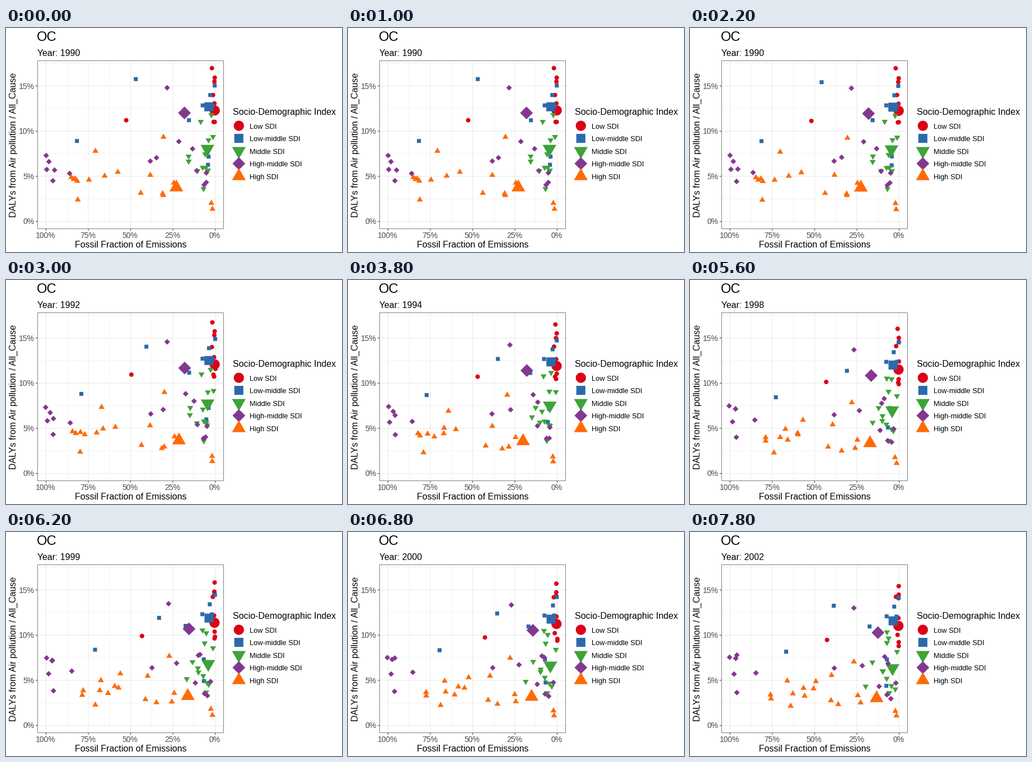
Write a matplotlib script that moves like this. It is 600x400 px and loops after 8000 ms.

```python
import numpy as np
import matplotlib.pyplot as plt
from matplotlib.animation import FuncAnimation
from matplotlib.collections import PolyCollection

plt.rcParams["font.family"] = "Liberation Sans"
DPI, FRAMES, START = 100, 40, 10
PT = 72 / DPI
YEARS_PER_FRAME = 3 / 7
BASELINE = 345.5
SMALL, LARGE = 4.0, 9.1
rng = np.random.default_rng(7)


def polygon(sides, radius, turn=0.0):
    """Regular polygon around its centre; turn 0 puts a corner on top."""
    a = np.arange(sides) * 2 * np.pi / sides + turn
    return radius * np.column_stack([np.sin(a), -np.cos(a)])


# All outlines cover the area of a unit circle.
QUAD = np.sqrt(np.pi / 2)
TRIANGLE = np.sqrt(4 * np.pi / 27 ** .5)

# Per group: outline, colour, share of the height lost over the loop,
# mean marker, then dots. Each is a run of x, y key points in stage pixels;
# a dot with a single key point simply sinks by the share of its group.
GROUPS = {
    "Low SDI": (polygon(48, 1), "#dc0017", .09, (373, 147.5, 372.5, 168), [
        (215, 165, 243, 180, 245, 193), (370, 120, 368, 116), (373, 150, 373, 204),
        (368, 72, 373, 97), (373, 89), (372.5, 96), (372.5, 135), (371, 168),
        (373, 168, 373, 197)]),
    "Low-middle SDI": (polygon(4, QUAD, np.pi / 4), "#2a6aab", .06, (362.5, 141, 363, 159), [
        (232, 91.5, 288, 172, 257, 132), (127, 202, 172, 214), (327, 165, 321, 169),
        (365, 120), (373, 103), (351.5, 138.5), (369, 139), (362, 230, 352, 228),
        (361, 244.5, 351, 275)]),
    "Middle SDI": (polygon(3, TRIANGLE, np.pi), "#3da337", .13, (360, 216, 362, 243.5), [
        (348, 167.5, 352, 179), (367, 155.5, 355, 190), (370, 194.5), (362, 200.5, 352, 198),
        (326.5, 229.5, 340, 228, 326, 233), (326.5, 238.5, 329, 250, 314, 276),
        (342, 255.5, 345, 249), (351.5, 249.5), (357, 249.5, 367, 281),
        (361, 254.5, 360, 275), (356, 225.5, 344, 240, 344, 248.5), (353, 287.5, 356, 287.5)]),
    "High-middle SDI": (polygon(4, QUAD), "#84378f", .05, (319, 152, 320, 168, 336, 180), [
        (72, 228, 71, 224), (77, 239, 82, 226), (87, 254, 81, 234, 84, 220),
        (73, 253, 79, 254), (84, 273, 84, 287), (114, 260, 115, 249, 118, 252), (258, 238),
        (269, 232, 302, 231, 308, 239), (288, 107, 293, 136), (309, 203, 345, 205, 354, 235),
        (333.5, 216, 348, 223), (341, 255, 338, 276), (358, 259, 368, 270),
        (358, 276, 359, 298), (354, 280.5, 352, 291)]),
    "High SDI": (polygon(3, TRIANGLE), "#ff6a05", .22, (304.5, 285, 318, 290, 333.5, 297), [
        (160, 220, 225, 267), (117, 267, 144, 291), (121, 270.5, 145, 298),
        (124, 269.5, 184, 289), (127.5, 273.5, 205, 293), (148.5, 271.5, 221, 280),
        (176.5, 264.5, 169, 266, 174, 266), (200, 257.5, 188, 272, 203, 279),
        (128.5, 307, 142, 309, 180, 311), (241, 295, 252, 301), (281, 299, 265, 308),
        (280, 296, 305, 305), (258, 263, 253, 256), (281.5, 195, 293, 232),
        (367, 313), (369, 323.5), (300, 277)]),
}

fig = plt.figure(figsize=(6, 4), dpi=DPI, facecolor="white")
ax = fig.add_axes([0, 0, 1, 1])
ax.set(xlim=(0, 600), ylim=(400, 0))
ax.axis("off")


def line(xs, ys, color, width=1.0, z=1):
    ax.plot(xs, ys, color=color, lw=width * PT, zorder=z, snap=False,
            solid_capstyle="butt", solid_joinstyle="miter")


def label(x, y, text, size, color="black", **kw):
    return ax.text(x, y, text, fontsize=size * PT, color=color, va="baseline", **kw)


def marker_layer(color, z):
    layer = PolyCollection([], facecolors=color, linewidths=0, zorder=z)
    layer.set_snap(False)
    ax.add_collection(layer, autolim=False)
    return layer


def draw_chart():
    left, right, top, bottom = 56.5, 388.5, 58.5, 358.5
    for p in np.arange(0, 101, 12.5):
        x = 373.5 - 3.02 * p
        major = p % 25 == 0
        line([x, x], [top, bottom], "#ebebeb", 1.1 if major else .55)
        if major:
            line([x, x], [bottom, bottom + 3.5], "#333333")
            label(x - 1, 375, f"{p:.0f}%", 14, "#4d4d4d", ha="center")
    for p in np.arange(0, 18, 2.5):
        y = BASELINE - 16.13 * p
        major = p % 5 == 0
        line([left, right], [y, y], "#ebebeb", 1.1 if major else .55)
        if major:
            line([left - 3.5, left], [y, y], "#333333")
            label(50.7, y + 5, f"{p:.0f}%", 14, "#4d4d4d", ha="right")
    line([left, right, right, left, left], [top, top, bottom, bottom, top], "#7f7f7f", 1, 20)
    label(55, 22.8, "OC", 23.8)
    label(222.3, 392, "Fossil Fraction of Emissions", 16, ha="center")
    label(17.6, 208.5, "DALYs from Air pollution / All_Cause", 16, ha="center",
          rotation=90, rotation_mode="anchor")


def draw_legend():
    label(405, 154.5, "Socio-Demographic Index", 16)
    for row, (name, (outline, color, *_)) in enumerate(GROUPS.items()):
        y = 174.6 + 22.5 * row
        marker_layer(color, 5).set_verts([outline * LARGE + (415.8, y)])
        label(435, y + 5.4, name, 12.9)


def yearly_path(keys, fall, wobble):
    """Positions for every frame: straight legs with a small yearly wobble."""
    points = np.reshape(keys, (-1, 2)).astype(float)
    if len(points) == 1:
        x, y = points[0]
        points = np.array([(x, y), (x, y + fall * (BASELINE - y))])
    frames = np.maximum(np.arange(FRAMES) - START, 0)
    legs = np.linspace(0, frames[-1], len(points))
    years = np.arange(14)
    path = np.empty((FRAMES, 2))
    for axis, amount in enumerate((1.2, .8)):
        noise = rng.normal(0, amount * wobble, len(years))
        noise[[0, -2, -1]] = 0
        path[:, axis] = (np.interp(frames, legs, points[:, axis])
                         + np.interp(frames * YEARS_PER_FRAME, years, noise))
    return path - .3


draw_chart()
draw_legend()
year = label(55.5, 50, "", 15.9)
layers = []
for z, (outline, color, fall, mean, dots) in enumerate(GROUPS.values(), 6):
    marks = [(outline * SMALL, yearly_path(dot, fall, 1)) for dot in dots]
    marks.append((outline * LARGE, yearly_path(mean, fall, 0)))
    layers.append((marker_layer(color, z), marks))


def update(n):
    year.set_text(f"Year: {round(1990 + max(0, n - START) * YEARS_PER_FRAME)}")
    for layer, marks in layers:
        layer.set_verts([shape + path[n] for shape, path in marks])
    return [year] + [layer for layer, _ in layers]


anim = FuncAnimation(fig, update, frames=FRAMES, interval=200, repeat=True,
                     repeat_delay=0, blit=False)
plt.show()
```
